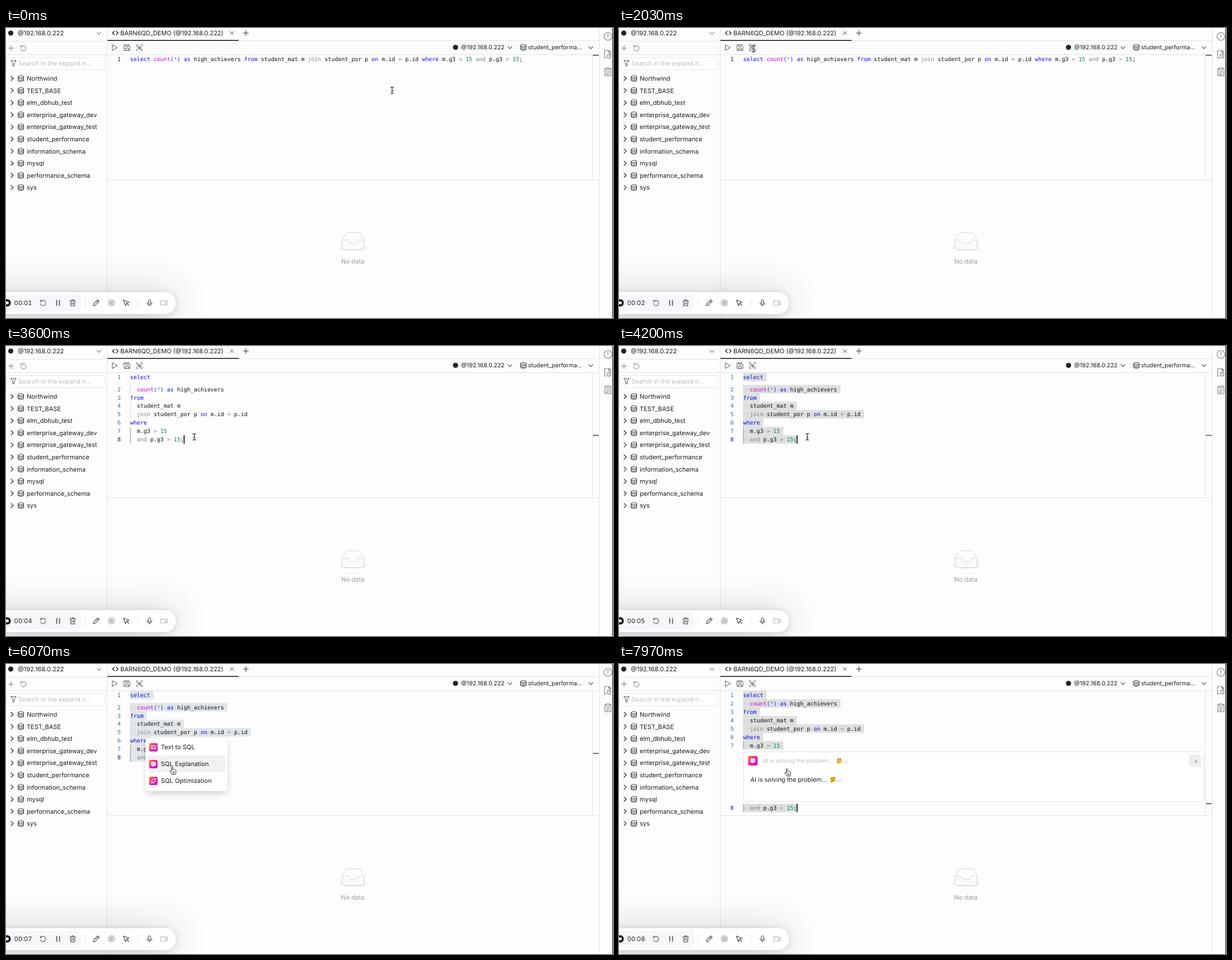
Recreate the animation shown at these times as an HTML page. Size 1083 px wide and 517 px high, loop 8 s.

```html
<!DOCTYPE html>
<html lang="en">
<head>
<meta charset="utf-8">
<title>SQL editor</title>
<style>
html, body { margin: 0; width: 100%; height: 100%; overflow: hidden; background: #fdfdfe; }
svg { display: block; width: 100vw; height: 100vh; }
text { font-family: Inter, Roboto, sans-serif; text-rendering: geometricPrecision; white-space: pre; }
.code { font-family: "DejaVu Sans Mono", "Liberation Mono", monospace; font-size: 9.945px; }
.num { font-variant-numeric: tabular-nums; }
.i { fill: none; stroke-linecap: round; stroke-linejoin: round; }
</style>
</head>
<body>
<svg id="stage" viewBox="0 0 1083 517" xmlns="http://www.w3.org/2000/svg">
<defs>
  <linearGradient id="ai" x1="0" y1="0" x2="1" y2="1">
    <stop offset="0" stop-color="#ff7a1f"/><stop offset=".5" stop-color="#ee1f9b"/><stop offset="1" stop-color="#b411e8"/>
  </linearGradient>
  <filter id="wide" x="-50%" y="-400%" width="200%" height="900%"><feGaussianBlur stdDeviation="34"/></filter>
  <filter id="soft" x="-30%" y="-60%" width="160%" height="220%"><feGaussianBlur stdDeviation="7"/></filter>
</defs>
</svg>
<script>
const LOOP = 8000;
const CHAR = 5.987, CODE_X = 221.5, LINE = 14.93, LENS = 6.6;
const FORMAT_AT = 2450, FOCUS_AT = 2700, SELECT_AT = 4150;
const MENU_AT = 5150, PANEL_AT = 6920, LAYOUT_AT = 7020;
const TICKS = [1050, 2060, 3040, 4020, 4990, 6030, 7010];
const POINTER = [
  [0, 689, 111], [700, 689, 111], [2000, 240, 37], [2500, 240, 37],
  [3300, 336, 162], [4250, 336, 162], [4850, 249, 131], [5300, 249, 131],
  [5980, 298, 190], [6200, 298, 190], [6600, 301, 193]
];
const FLAT_SQL = ['select count(*) as high_achievers from student_mat m join student_por p on m.id = p.id where m.g3 > 15 and p.g3 > 15;'];
const SQL = ['select', '  count(*) as high_achievers', 'from', '  student_mat m',
  '  join student_por p on m.id = p.id', 'where', '  m.g3 > 15', '  and p.g3 > 15;'];
const TABLES = ['Northwind', 'TEST_BASE', 'elm_dbhub_test', 'enterprise_gateway_dev', 'enterprise_gateway_test',
  'student_performance', 'information_schema', 'mysql', 'performance_schema', 'sys'];
const MENU = ['Text to SQL', 'SQL Explanation', 'SQL Optimization'];

const stage = document.getElementById('stage');

// Markup helpers; y of a label is its visual middle.
const label = (x, y, str, size = 11, fill = '#1c1c1e', extra = '') =>
  `<text x="${x}" y="${y + size * .36}" font-size="${size}" fill="${fill}" ${extra}>${str}</text>`;
const rect = (x, y, w, h, fill, r = 0, extra = '') =>
  `<rect x="${x}" y="${y}" width="${w}" height="${h}" rx="${r}" fill="${fill}" ${extra}/>`;
const icon = (x, y, d, color = '#333', width = 1, extra = '') =>
  `<path class="i" transform="translate(${x} ${y})" d="${d}" stroke="${color}" stroke-width="${width}" ${extra}/>`;
const dot = (x, y, r, fill) => `<circle cx="${x}" cy="${y}" r="${r}" fill="${fill}"/>`;

const DOWN = 'M-3.5-2 0 2 3.5-2';
const RIGHT = 'M-2-3.8 2 0-2 3.8';
const PLUS = 'M-4.5 0H4.5M0-4.5V4.5';
const CROSS = 'M-3-3 3 3M3-3-3 3';
const DATABASE = 'M-5-3.4C-5-5.8 5-5.8 5-3.4S-5-1-5-3.4V3.4C-5 5.8 5 5.8 5 3.4V-3.4M-5-.9C-5 1.4 5 1.4 5-.9M-5 1.8C-5 4 5 4 5 1.8';
const REFRESH = 'M-3.8-2.8A4.8 4.8 0 1 1-4.8 1M-4.6-5V-2.3H-1.9';

function sidebar() {
  const rows = TABLES.map((name, i) => {
    const y = 90 + 21.6 * i;
    return icon(11, y, RIGHT, '#222', 1.2) + icon(26.5, y, DATABASE, '#333') + label(37, y, name);
  });
  return dot(8.5, 9, 4.6, '#222') + label(21, 9, '@192.168.0.222', 11.1) + icon(166, 9.5, DOWN, '#444') +
    icon(9, 36, PLUS, '#777') + icon(31, 36, REFRESH, '#777') +
    rect(1.5, 52.5, 174.5, 22, '#fff', 3, 'stroke="#e6e6e8"') +
    icon(13.5, 63, 'M-4.7-5H4.7L1.5-.5V3.6L-1.5 5V-.5Z', '#444') +
    label(22, 63.3, 'Search in the expand n…', 11.1, '#bcbcc0') + rows.join('');
}

function chrome() {
  const lines = [[180.5, 0, 180.5, 517], [0, 23.5, 180, 23.5], [181, 22.5, 1058, 22.5], [0, 47.5, 180, 47.5],
    [181, 47.5, 1058, 47.5], [1058.5, 0, 1058.5, 517], [1046.5, 48, 1046.5, 270], [181, 270.5, 1058, 270.5]];
  return lines.map(([a, b, c, d]) => `<path d="M${a} ${b}L${c} ${d}" stroke="#e2e2e8"/>`).join('') +
    rect(181, 21.4, 234, 1.6, '#1a1a1a') + rect(1082, 0, 1, 517, '#111') +
    icon(195, 9, 'M-1.6-3.2-5 0-1.6 3.2M1.6-3.2 5 0 1.6 3.2', '#111', 1.2) +
    label(204, 9, 'BARN6QD_DEMO (@192.168.0.222)') +
    icon(403, 9, CROSS, '#555') + icon(428, 9, PLUS, '#333', 1.1) +
    `<rect id="hover" x="231" y="27.5" width="15" height="15" rx="3" fill="#e7e7e9"/>` +
    icon(194, 35, 'M-4-5 4.5 0-4 5Z', '#555') +
    icon(216, 35, 'M-5-5H2.8L5-2.8V5H-5ZM-2.3-5V-2H2V-5M-2.5 5V1H2.5V5', '#555') +
    icon(238, 35, 'M-5-2.5V-5H-2.5M2.5-5H5V-2.5M5 2.5V5H2.5M-2.5 5H-5V2.5M-2.2-2.2H1V1H-2.2ZM1-.6H2.6V2.6H-.6V1', '#555') +
    dot(802, 34.5, 4.6, '#222') + label(812, 34.7, '@192.168.0.222', 10.45) + icon(899, 35, DOWN, '#333', 1.1) +
    icon(923, 34.5, DATABASE, '#333') + label(931.5, 34.7, 'student_performa…', 10.4) + icon(1043.5, 35, DOWN, '#333', 1.1) +
    icon(1074, 15, 'M-7 0A7 7 0 1 1 7 0A7 7 0 1 1-7 0M0-3.6V1M0 3.3V3.4', '#777', 1.1) +
    icon(1073.5, 47, 'M-2 6.5H-5.5V-7H2L5.5-3.5V-1.5M2-7V-3.5H5.5M-1 3A3.6 3.6 0 1 1 6.2 3A3.6 3.6 0 1 1-1 3M2.6 1.2V3.2H4', '#777', 1.1) +
    icon(1074, 78, 'M-3-5.5H-5.5V7H5.5V-5.5H3M-3-7H3V-4H-3ZM-2.8-.8H2.8M-2.8 2H2.8M-2.8 4.6H1', '#777', 1.1);
}

function emptyState() {
  return `<ellipse cx="619" cy="391.5" rx="25" ry="5.2" fill="#f3f3f4"/>` +
    icon(619.5, 380, 'M-19.5-2-12.5-13.5Q-11.5-15-10-15H10Q11.5-15 12.5-13.5L19.5-2V12.5Q19.5 15 17 15H-17Q-19.5 15-19.5 12.5Z', '#d5d5d8', 1, 'style="fill:#fdfdfe"') +
    icon(619.5, 380, 'M-19.5-2H-9.5C-7-2-8 4-4.5 4H4.5C8 4 7-2 9.5-2H19.5V12.5Q19.5 15 17 15H-17Q-19.5 15-19.5 12.5Z', '#d5d5d8', 1, 'style="fill:#fafafa"') +
    label(598, 415.5, 'No data', 11.2, '#9b9ba0');
}

function recorder() {
  const grid = [];
  for (let r = -2; r <= 2; r++) for (let c = -2; c <= 2; c++)
    if (Math.abs(r * c) < 4) grid.push(dot(188 + c * 2.5, 490 + r * 2.5, r || c ? .8 : 1, '#555'));
  return rect(-60, 472, 362, 44, '#000', 20, 'opacity=".19" filter="url(#wide)"') +
    rect(-20, 473, 323, 38, '#000', 19, 'opacity=".14" filter="url(#soft)"') +
    rect(-40, 471, 343, 39, '#fff', 19) + rect(-40, 475, 174, 30.5, '#f7f7fb', 8) +
    dot(2, 490, 6.6, '#17171a') + rect(-.6, 487.4, 5.2, 5.2, '#fff', 1.2) +
    `<text id="clock" class="num" x="14.5" y="494.3" font-size="11.2" fill="#222"></text>` +
    icon(66, 490, REFRESH, '#666', 1.2) + icon(93, 490, 'M-2.5-4.5V4.5M2.5-4.5V4.5', '#555', 1.7) +
    icon(119, 490, 'M-5-3.5H5M-2-3.5V-5.3H2V-3.5M-4-3.5-3.5 5.5H3.5L4-3.5M-1.3-1V3M1.3-1V3', '#555', 1.2) +
    rect(141, 483, 1, 14, '#e4e4e8') + rect(235, 483, 1, 14, '#e4e4e8') +
    icon(161, 490, 'M-5.2 5.2-4.4 1.8 2.8-5.2 5.3-2.8-1.8 4.4ZM1-3.4 3.5-1', '#555', 1.2) + grid.join('') +
    icon(214.5, 490, 'M-5-5 5-1.2 .8 .8-1.2 5ZM.8.8 4.5 4.5', '#444', 1.2) +
    icon(256, 490, 'M-2-3.5A2 2 0 0 1 2-3.5V0A2 2 0 0 1-2 0ZM-4.3-.5A4.3 4.3 0 0 0 4.3-.5M0 3.8V5.8', '#555', 1.2) +
    icon(282, 490, 'M-6-4H2.5V4H-6ZM2.5-1 6-3.4V3.4L2.5 1M-3.8-1.8H-1', '#b9b9bd', 1.1);
}

function aiIcon(x, y, size, kind) {
  const glyphs = ['M-4-2.8H4V2.8H-4ZM-2-.8-.8 0-2 1M.5 1H2', 'M-3.6-3.4H3.6V2.5H.8L-1.2 4V2.5H-3.6ZM-1.6-1H1.6M-1.6.8H.6', 'M-3.5.5C-1.5-3.5 1.5-4 4-4C4-1.5 3.5 1.5-.5 3.5ZM-3.5 3.8-2 2.2'];
  return rect(x - size / 2, y - size / 2, size, size, 'url(#ai)', 3) +
    icon(x, y, glyphs[kind], '#fff', 1.2, kind == 1 ? 'style="fill:#ffffff88"' : '');
}

function thinking(x, y, opacity) {
  return `<g transform="translate(${x} ${y})" opacity="${opacity}">` + dot(0, 0, 5, '#fcc53a') +
    dot(-1.8, -1.2, .8, '#54320c') + dot(1.9, -1.4, .8, '#54320c') +
    icon(0, 0, 'M-3.2-2.6-1-3M1-3.4 3-3M-1.6 1.6Q.4.9 2 1.8', '#54320c', .8) +
    icon(0, 0, 'M-3.6 3.8-.4 2.8M-3.8 2.6Q-4 5.5-1.4 5', '#e59a1d', 1.3) +
    icon(11, 0, 'M-4 2A2.4 2.4 0 0 1-3-2.4A3.4 3.4 0 0 1 3-2.6A2.5 2.5 0 0 1 3.6 2.2Q0 3.6-4 2', '#ececf0', .8, 'style="fill:#fff"') +
    icon(11, 0, 'M-3.6 2.5Q0 4 4 2.2M-4.7 4.3H-4.4', '#b5b7c0', .9) + '</g>';
}

function menu() {
  return rect(252, 137, 141, 93, '#000', 6, 'opacity=".22" filter="url(#soft)"') + rect(249, 132, 146, 94.5, '#fff', 5) +
    rect(253, 163, 138, 30, '#f3f0f2', 3, 'id="menuHover"') +
    MENU.map((name, i) => aiIcon(263, 148.5 + 30 * i, 15, i) + label(276.5, 148.3 + 30 * i, name, 11.05)).join('');
}

function panel() {
  const message = 'AI is solving the problem...';
  return rect(222.5, 156.5, 821, 88.5, '#fff', 3, 'stroke="#dedee2"') + aiIcon(238.8, 172.5, 17, 1) +
    label(256, 172.7, message, 10.15, '#bdbdc1') + thinking(393, 172.5, .85) +
    label(234.5, 206.3, message, 10.95) + thinking(381.7, 206, 1) +
    rect(1017, 162, 21.5, 21.5, '#eeeef0', 3) + '<g id="spinner"></g>';
}

function pointers() {
  return `<g id="pointer"><g id="beam">` +
    icon(0, 0, 'M-2.6-5.6Q-.6-5.6 0-4.6Q.6-5.6 2.6-5.6M0-4.6V4.6M-2.6 5.6Q-.6 5.6 0 4.6Q.6 5.6 2.6 5.6M-1.4 1H1.4', '#fff', 2.4) +
    icon(0, 0, 'M-2.6-5.6Q-.6-5.6 0-4.6Q.6-5.6 2.6-5.6M0-4.6V4.6M-2.6 5.6Q-.6 5.6 0 4.6Q.6 5.6 2.6 5.6M-1.4 1H1.4', '#222', 1.1) +
    `</g><g id="hand">` +
    icon(0, 0, 'M-2.6 1.2V-5.2Q-2.6-6.6-1.5-6.6T-.4-5.2V-1.8Q.8-2.6 1.6-1.5Q2.8-2.1 3.5-1Q5.2-1.4 5.2.5V2.6Q5.2 4.6 4 6.8H-1.7Q-2.4 4.9-4.6 2.4Q-5.8.8-4.6.2Q-3.6 0-2.6 1.2ZM.3 2V4.6M2.1 2V4.6', '#222', 1, 'style="fill:#fff"') +
    '</g></g>';
}

const escapeXml = s => s.replace(/>/g, '&gt;');
const TOKEN = /\b(?:select|as|from|on|where)\b|\bcount\b|\b(?:join|and)\b|\b\d+\b|[()]|[=>*]/g;

function tokenColor(token) {
  if (token === 'count') return '#c700c7';
  if (/\d/.test(token)) return '#098658';
  if (/[()]/.test(token)) return '#0431fa';
  return /join|and|[=>*]/.test(token) ? '#7d858d' : '#0a0af0';
}

function highlight(line) {
  let out = '', last = 0;
  for (const m of line.matchAll(TOKEN)) {
    out += escapeXml(line.slice(last, m.index)) + `<tspan fill="${tokenColor(m[0])}">${escapeXml(m[0])}</tspan>`;
    last = m.index + m[0].length;
  }
  return out + line.slice(last);
}

function editor({ lines, lens, selected, dimmed, caret, lastDrop }) {
  return lines.map((line, i) => {
    const isLast = i === lines.length - 1;
    const y = 55.5 + LINE * i + (lens && i ? LENS : 0) + (isLast ? lastDrop : 0);
    const top = y - 7.5, end = CODE_X + CHAR * line.length;
    let out = '';
    if (selected) out += rect(CODE_X, top, end - CODE_X + (isLast ? 0 : CHAR), 15, dimmed ? '#e2e6e8' : '#dedfdf');
    if (line[0] === ' ') out += rect(221.5, top, 1, 15, i > 5 ? '#8f8f94' : '#d8d8dc');
    if (selected) [...line].forEach((c, k) => { if (c === ' ') out += dot(CODE_X + CHAR * (k + .5), y + .5, .7, '#b4b4b6'); });
    out += `<text class="code" x="204.8" y="${y + 3.6}" text-anchor="end" fill="${isLast ? '#0b216f' : '#237893'}">${i + 1}</text>` +
      `<text class="code" x="${CODE_X}" y="${y + 3.6}" fill="#111">${highlight(line)}</text>`;
    if (caret && isLast) out += rect(end - .4, top, 1.6, 15, '#000');
    return out;
  }).join('');
}

stage.insertAdjacentHTML('beforeend',
  rect(0, 0, 1083, 517, '#fdfdfe') + chrome() + sidebar() + emptyState() + recorder() +
  `<g id="editor"></g><rect id="ruler" x="1047" width="10.5" height="1.6" fill="#4a4a4a"/>` +
  `<g id="menu">${menu()}</g><g id="panel">${panel()}</g>` + pointers());

const el = Object.fromEntries([...stage.querySelectorAll('[id]')].map(n => [n.id, n]));
const show = (node, on) => node.setAttribute('display', on ? 'inline' : 'none');

function pointerAt(t) {
  const k = POINTER.findIndex(p => p[0] > t);
  if (k < 0) return POINTER.at(-1).slice(1);
  const [t0, x0, y0] = POINTER[k - 1], [t1, x1, y1] = POINTER[k];
  const u = (t - t0) / (t1 - t0), e = u * u * (3 - 2 * u);
  return [x0 + (x1 - x0) * e, y0 + (y1 - y0) * e];
}

function spinner(age) {
  const lit = Math.min(3, 1 + Math.floor(age / 160)), head = 1 + Math.floor(age / 125);
  let out = '';
  for (let i = 0; i < lit; i++) {
    const a = (head - i) * Math.PI / 4, c = Math.cos(a), s = Math.sin(a);
    out += `<path class="i" d="M${1027 + c * 2} ${173.5 + s * 2}L${1027 + c * 4.2} ${173.5 + s * 4.2}" stroke="#333" opacity="${1 - i * .2}"/>`;
  }
  return out;
}

let editorKey = '';

function render(t) {
  const formatted = t >= FORMAT_AT, open = t >= PANEL_AT, settled = t >= LAYOUT_AT;
  const menuOpen = t >= MENU_AT && !open;
  const state = {
    lines: formatted ? SQL : FLAT_SQL, lens: formatted && !open, selected: t >= SELECT_AT, dimmed: menuOpen,
    caret: t >= FOCUS_AT && (!open || settled), lastDrop: settled ? 96.5 : open ? 40 : 0
  };
  const key = JSON.stringify(state);
  if (key !== editorKey) el.editor.innerHTML = editor(state);
  editorKey = key;

  el.ruler.setAttribute('y', settled ? 248.2 : open ? 191.7 : formatted ? 158.6 : 47.8);
  el.clock.textContent = '00:0' + (1 + TICKS.filter(at => t >= at).length);

  const [x, y] = pointerAt(t);
  const onButton = Math.abs(x - 239) < 9 && y < 46;
  const hand = onButton && t > 2060 || t >= MENU_AT && y > 138;
  el.pointer.setAttribute('transform', `translate(${x.toFixed(2)} ${y.toFixed(2)})`);
  show(el.hand, hand);
  show(el.beam, !hand);
  show(el.hover, onButton);

  show(el.menu, menuOpen);
  show(el.menuHover, y > 138);
  el.menuHover.setAttribute('y', y - 6 < 163 ? 133 : 163);
  show(el.panel, open);
  if (open) el.spinner.innerHTML = spinner(t - PANEL_AT);
}

const start = performance.now();
function loop() {
  render((performance.now() - start) % LOOP);
  requestAnimationFrame(loop);
}
loop();
</script>
</body>
</html>
```
